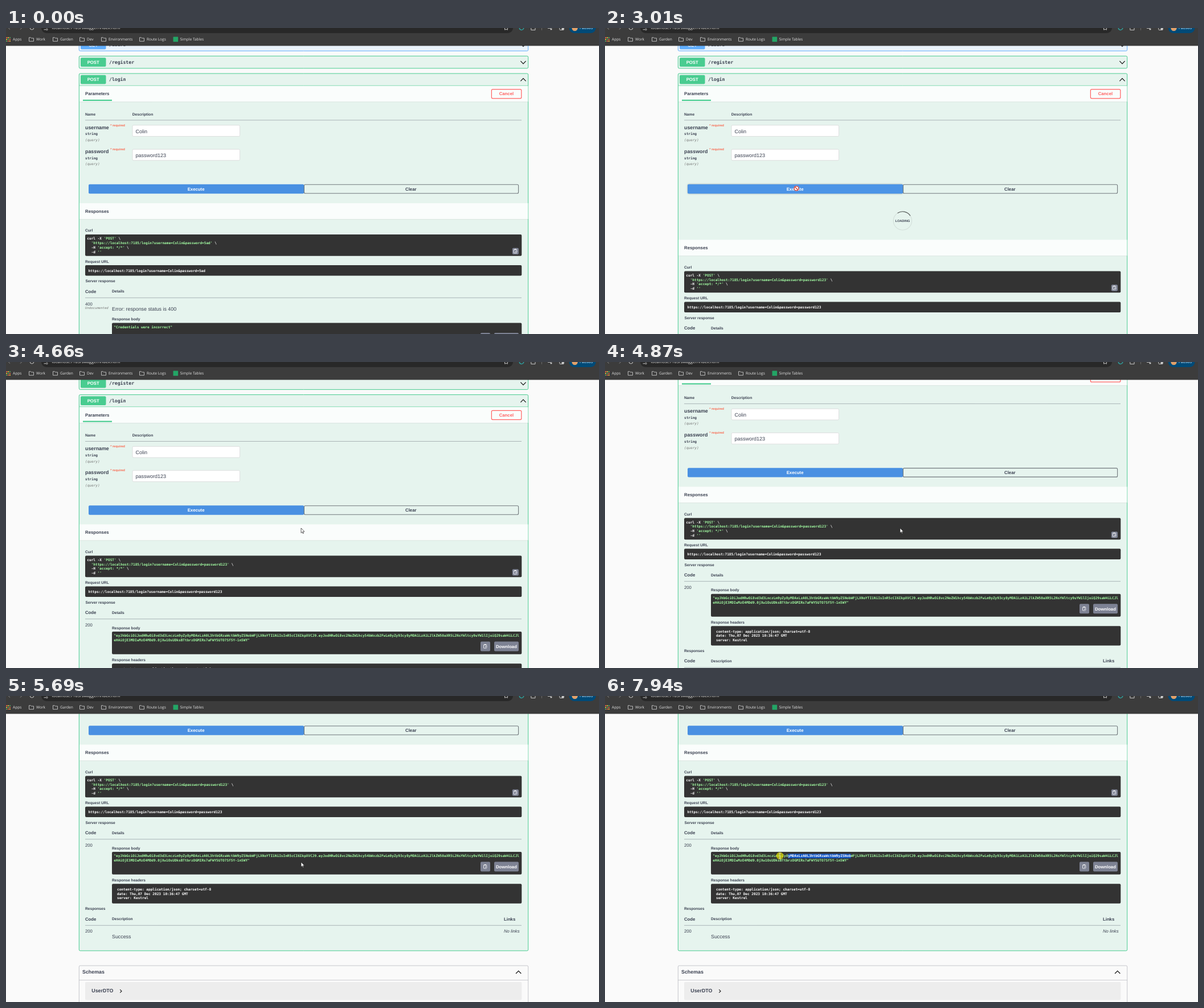
An HTML page with a canvas for the animation above (8000 ms loop, 1041x538 px).

```html
<!DOCTYPE html>
<html lang="en">
<head>
<meta charset="utf-8">
<title>API page</title>
<style>
  html, body { margin: 0; width: 100%; height: 100%; overflow: hidden; background: #fafafa; }
  canvas { display: block; }
</style>
</head>
<body>
<canvas id="stage" width="1041" height="538"></canvas>
<script>
const ctx = document.getElementById('stage').getContext('2d');
const LOOP = 8000;
const SANS = '"Liberation Sans", Arial, sans-serif';
const MONO = '"DejaVu Sans Mono", monospace';
const UI = '"Open Sans", sans-serif';
const INK = '#3b4151', GREEN = '#49cc90', DARK = '#333', CODE = '#a2fca2', GREY = '#7d8293';
const CHAR = 3.672, MONO_SIZE = 6.1;
const USER = 'Colin';
const TOKEN = [
  '"eyJhbGciOiJodHRwOi8vd3d3LnczLm9yZy8yMDAxLzA0L3htbGRzaWctbW9yZSNobWFjLXNoYTI1NiIsInR5cCI6IkpXVCJ9.' +
  'eyJodHRwOi8vc2NoZW1hcy54bWxzb2FwLm9yZy93cy8yMDA1LzA1L2lkZW50aXR5L2NsYWltcy9uYW1lIjoiQ29saW4iLCJl',
  'eHAiOjE3MDIwMzE4MDd9.0jXw1OsUDksBTtbrzDGMIRs7aFWY5UTO7Sf5Y-1n5WY"'
];
const TOKEN_X = 189.3, ANCHOR = 66;

const BURSTS = [
  [130, 880, 12], [950, 1720, 12], [1790, 2550, 12], [2600, 3360, 12], [3430, 3920, 8],
  [4600, 5290, 11], [5690, 6450, 12], [6520, 7010, 8], [7210, 7940, 12]
];
const LOAD_START = 2985, LOAD_END = 3495;
const SCROLL = [[4530, 0], [4600, 5], [4738, 40], [4873, 87.5], [5151, 193], [5221, 213], [5290, 222.5]];
const POINTER = [
  [130, 1000, 526], [400, 800, 330], [700, 320, 160], [880, 203, 80], [1090, 188, 118], [1350, 260, 175],
  [1720, 255, 229], [1790, 245, 224], [2050, 165, 268], [2250, 155, 292], [2550, 332, 284], [2600, 336, 282],
  [3440, 336, 282], [3640, 395, 292], [3920, 518, 292], [5690, 518, 292], [5900, 420, 335], [6100, 300, 330],
  [6250, 268, 290], [6330, 290, 260], [6450, 310, 300], [6520, 317, 338], [6590, 355, 335], [6660, 401, 306],
  [6800, 430, 295], [7010, 433, 281], [7210, 432, 281], [7280, 428, 288], [7350, 420, 288], [7420, 404, 282],
  [7940, 307, 281]
];

function snap(t) {
  for (let i = BURSTS.length - 1; i >= 0; i--) {
    const [a, b, n] = BURSTS[i];
    if (t < a) continue;
    const step = (b - a) / (n - 1);
    return Math.min(b, a + Math.floor((t - a + 8) / step) * step);
  }
  return 0;
}

// Linear interpolation through [time, ...values] points
function along(points, t) {
  if (t <= points[0][0]) return points[0].slice(1);
  for (let i = 1; i < points.length; i++) {
    const p = points[i - 1], q = points[i];
    if (t <= q[0]) {
      const k = (t - p[0]) / (q[0] - p[0]);
      return p.slice(1).map((v, j) => v + (q[j + 1] - v) * k);
    }
  }
  return points[points.length - 1].slice(1);
}

function text(s, x, y, size, { color = INK, style = '', font = SANS, align = 'left' } = {}) {
  ctx.font = `${style} ${size}px ${font}`;
  ctx.textAlign = align;
  ctx.fillStyle = color;
  ctx.fillText(s, x, y);
}
const bold = (s, x, y, size = 6.65, color = INK, align = 'left') =>
  text(s, x, y, size, { color, style: 'bold', align });
const mono = (s, x, y, color = '#fff', size = MONO_SIZE, style = 'bold') =>
  text(s, x, y, size, { color, style, font: MONO });

function box(x, y, w, h, fill, r = 2, stroke, lw = 1) {
  ctx.beginPath();
  ctx.roundRect(x, y, w, h, r);
  if (fill) { ctx.fillStyle = fill; ctx.fill(); }
  if (stroke) { ctx.strokeStyle = stroke; ctx.lineWidth = lw; ctx.stroke(); }
}
function line(points, color, lw = 1, close) {
  ctx.beginPath();
  points.forEach(([x, y]) => ctx.lineTo(x, y));
  if (close) ctx.closePath();
  ctx.strokeStyle = color;
  ctx.lineWidth = lw;
  ctx.stroke();
}
function disc(x, y, r, fill) {
  ctx.beginPath();
  ctx.arc(x, y, r, 0, 7);
  ctx.fillStyle = fill;
  ctx.fill();
}
function arc(x, y, r, a, b, color, lw) {
  ctx.beginPath();
  ctx.arc(x, y, r, a, b);
  ctx.strokeStyle = color;
  ctx.lineWidth = lw;
  ctx.stroke();
}
const rule = y => line([[139, y], [905, y]], 'rgba(59,65,81,.45)', 0.8);
const chevron = (x, y, d) => line([[x - 4.6, y - 2.3 * d], [x, y + 2.3 * d], [x + 4.6, y - 2.3 * d]], '#111', 1.2);

function summary(y, verb, path, color, open) {
  box(131, y + 3, 44.5, 15.7, color, 2);
  bold(verb, 153.2, y + 13.7, 7.75, '#fff', 'center');
  mono(path, 181, y + 13.5, INK, 8.13);
  chevron(908, y + 11.3, open ? -1 : 1);
}

function field(y, name, value) {
  bold(name, 139, y + 5, 8.86);
  bold('* required', 183.3, y, 5.5, 'rgba(255,60,30,.75)');
  mono('string', 139, y + 15.7, INK);
  mono('(query)', 139, y + 26.4, '#777', MONO_SIZE, 'italic');
  box(222, y - 1.7, 188.5, 19.6, '#fff', 2, '#d9d9d9', 0.8);
  text(value, 227.5, y + 12, 9);
}

function section(y, h) {
  ctx.fillStyle = 'rgba(255,255,255,.82)';
  ctx.fillRect(129, y, 787.5, h);
  line([[129, y + h + 0.3], [916.5, y + h + 0.3]], 'rgba(0,0,0,.09)', 0.8);
}

function copyIcon(x, y, size) {
  box(x, y, size, size, GREY, 2);
  const cx = x + size / 2, cy = y + size / 2;
  box(cx - 3, cy - 3, 5.2, 6.2, null, 0.5, '#fff', 0.8);
  box(cx - 1.8, cy - 3.8, 2.8, 1.6, '#fff', 0.4);
  box(cx - 0.2, cy - 0.6, 4, 3.2, GREY, 0);
  line([[cx + 3.6, cy + 0.8], [cx, cy + 0.8], [cx + 1.4, cy - 0.5]], '#fff', 0.7);
  line([[cx, cy + 0.8], [cx + 1.4, cy + 2.1]], '#fff', 0.7);
}

function request(password) {
  const url = `https://localhost:7185/login?username=${USER}&password=${password}`;
  section(308, 28);
  bold('Responses', 139, 324.8, 7.8);
  bold('Curl', 139, 358.4);
  box(139, 363, 766.3, 37.8, DARK);
  const rows = [
    ['curl -X ', "'POST'", ' \\'], ['  ', `'${url}'`, ' \\'],
    ['  -H ', "'accept: */*'", ' \\'], ['  -d ', "''", '']
  ];
  rows.forEach(([a, b, c], i) => {
    const y = 372.3 + i * 7.8;
    mono(a, 142.3, y);
    mono(b, 142.3 + a.length * CHAR, y, CODE);
    mono(c, 142.3 + (a + b).length * CHAR, y);
  });
  copyIcon(888.8, 386.8, 11.2);
  bold('Request URL', 139, 412.5);
  box(139, 417, 766.3, 18.6, DARK);
  mono(url, 144.5, 428.5);
  bold('Server response', 139.6, 447.4);
  bold('Code', 139, 465.8, 7.75);
  bold('Details', 186, 465.3);
  rule(474.3);
}

function downloads(y) {
  copyIcon(833, y, 17);
  box(857, y, 43, 17, GREY, 2);
  bold('Download', 878.4, y + 11.3, 7.75, '#fff', 'center');
}

function failure() {
  text('400', 139, 487.6, 7.75);
  mono('Undocumented', 139, 494.4, '#777', 5.65, 'italic');
  text('Error: response status is 400', 186, 497, 8.86);
  bold('Response body', 186, 514.2);
  box(186, 518.5, 719.3, 40, DARK);
  mono('"Credentials were incorrect"', TOKEN_X, 528, CODE);
  downloads(536);
}

function success() {
  text('200', 139, 487.5, 7.75);
  bold('Response body', 186, 492);
  box(186, 496.5, 719.3, 39.8, DARK);
  TOKEN.forEach((s, i) => mono(s, TOKEN_X, 505.9 + i * 7.8, CODE));
  downloads(514);
  bold('Response headers', 186, 548.2);
  box(186, 552.8, 719.3, 34.4, DARK);
  ['content-type: application/json; charset=utf-8', 'date: Thu,07 Dec 2023 10:36:47 GMT', 'server: Kestrel']
    .forEach((s, i) => mono(s, 195, 564.2 + i * 7.8));
  bold('Responses', 139, 598.8);
  bold('Code', 139, 617, 7.75);
  bold('Description', 186, 616.4);
  bold('Links', 874, 617, 7.75);
  rule(625.8);
  text('200', 139, 638.6, 7.75);
  text('No links', 874, 638.6, 7.75, { style: 'italic' });
  text('Success', 186, 648.2, 8.86);
}

// Selected run on one token row, from character a to b
function highlight(row, a, b) {
  if (b <= a) return;
  const x = TOKEN_X + a * CHAR, y = 505.9 + row * 7.8;
  ctx.fillStyle = '#0f55c4';
  ctx.fillRect(x, y - 5.9, (b - a) * CHAR, 7.8);
  mono(TOKEN[row].slice(a, b), x, y);
}
function selection(t) {
  if (t < 7215) return;
  const [x, y] = along(POINTER, Math.max(7210, t - 70));
  const i = Math.round((x - TOKEN_X) / CHAR);
  if (y > 285.6) {
    highlight(0, ANCHOR, TOKEN[0].length);
    highlight(1, 0, i);
  } else highlight(0, i, ANCHOR);
}

function loader(t) {
  const turn = (t - LOAD_START) / 1000 * Math.PI * 2 + 0.02;
  arc(522.4, 339, 16.2, 0, 7, 'rgba(85,85,85,.13)', 1.1);
  arc(522.4, 339, 16.2, turn - Math.PI * 0.75, turn - Math.PI * 0.25, 'rgba(0,0,0,.6)', 1.1);
  bold('LOADING', 522.4, 341.2, 5.6, INK, 'center');
}

function page(t, scroll, hover) {
  const loading = t >= LOAD_START && t < LOAD_END;
  ctx.save();
  ctx.translate(0, -scroll);
  box(128.3, 18.5, 788.4, 21.8, '#ebf3fb', 2, '#61affe');
  summary(18.8, 'GET', '/users', '#61affe');
  box(128.3, 49.3, 788.4, 21.6, '#e6f4ee', 2, GREEN);
  summary(49.2, 'POST', '/register', GREEN);
  box(128.3, 80, 788.4, 590.4, '#e6f4ee', 2, GREEN);
  summary(79.7, 'POST', '/login', GREEN, true);
  line([[128.5, 101.3], [916.5, 101.3]], GREEN, 0.7);
  section(101.8, 27.8);
  bold('Parameters', 139, 118.3, 7.75);
  ctx.fillStyle = GREEN;
  ctx.fillRect(135, 126, 51, 2.2);
  box(852.4, 107.8, 52.4, 16, null, 2, '#ff6060', 1.2);
  bold('Cancel', 878.4, 118.3, 7.75, '#ff6060', 'center');
  bold('Name', 139, 153.5);
  bold('Description', 221.7, 153.5);
  rule(162);
  field(172.6, 'username', USER);
  field(214.9, 'password', 'password123');

  ctx.save();
  if (hover) { ctx.shadowColor = 'rgba(0,0,0,.3)'; ctx.shadowBlur = 3; }
  box(145, 274.8, 378, 16.4, hover ? '#4c94e6' : '#4990e2', 2);
  ctx.restore();
  bold('Execute', 333.6, 285.7, 7.8, '#fff', 'center');
  box(523.4, 275.3, 376.2, 15.5, null, 2, '#70787c', 1.1);
  bold('Clear', 710.8, 285.7, 7.8, INK, 'center');

  if (loading) loader(t);
  ctx.save();
  if (loading) ctx.translate(0, 64.4);
  request(t < LOAD_START ? '5ad' : 'password123');
  if (t < LOAD_START) failure();
  else if (!loading) success();
  ctx.restore();
  if (t >= LOAD_END) selection(t);

  box(128.3, 696.6, 788.4, 100, '#fafafa', 2, 'rgba(59,65,81,.35)', 0.8);
  bold('Schemas', 134, 710.3, 8.86);
  chevron(899.7, 708.2, -1);
  line([[128.5, 722], [916.5, 722]], 'rgba(59,65,81,.3)', 0.8);
  box(139, 725.3, 766.3, 31.7, '#ededed', 2);
  bold('UserDTO', 150.3, 743.7, 8.86);
  line([[200.2, 738.6], [203, 741.4], [200.2, 744.2]], '#222', 1.2);
  ctx.restore();
}

function browser() {
  const icon = '#c7c7c7';
  ctx.fillStyle = '#3c3c3c';
  ctx.fillRect(0, 0, 1041, 31.4);
  box(62, -12, 828, 21, '#282828', 9);
  text('localhost:7185/swagger/index.html', 80.5, 2.4, 7.35, { color: '#e3e3e3', font: UI });
  line([[7, 2.6], [3.8, -0.6]], '#8a8a8a');
  line([[25, 2.6], [28.2, -0.6]], '#8a8a8a');
  arc(45.5, -0.4, 3.4, 0, Math.PI, icon, 1);
  line([[66.5, 2.8], [70, 2.8]], icon);
  arc(71.8, 2.6, 1.3, 0, 7, icon, 0.9);
  line([[875.2, -1], [875.8, 3.4], [878, 2], [880.2, 3.4], [880.8, -1]], icon);
  arc(905, -0.5, 3.9, 0.1, 3, '#2f9c9c', 1.5);
  line([[921.8, -1], [921.8, 3.6], [929, 3.6], [929, -1]], icon);
  line([[940.5, 0], [940.5, 4]], '#6a6a6a');
  line([[951, 0.4], [956, 0.4]], icon);
  disc(957, 2, 1.6, icon);
  box(971.8, -4, 7.4, 7.5, null, 1, icon);
  box(975.5, -4, 3.7, 7.5, icon, 0);
  box(988.5, -12, 47, 21, '#004a77', 9);
  disc(998.5, 0, 5.2, '#e0a06a');
  text('Paused', 1007, 2.4, 6.8, { color: '#d3e8fb', font: UI });

  const dots = ['#ea5a4c', '#e9b83a', '#4fae62'];
  for (let i = 0; i < 9; i++) {
    ctx.fillStyle = dots[(i + Math.floor(i / 3)) % 3];
    ctx.fillRect(-0.2 + (i % 3) * 3, 16 + Math.floor(i / 3) * 3, 2, 2);
  }
  const label = (s, x) => text(s, x, 22.4, 6.55, { color: '#e3e3e3', font: UI });
  label('Apps', 12);
  [['Work', 40], ['Garden', 82], ['Dev', 129], ['Environments', 167], ['Route Logs', 234]].forEach(([s, x]) => {
    line([[x + 0.5, 16.7], [x + 3.4, 16.7], [x + 4.5, 17.9], [x + 8.5, 17.9], [x + 8.5, 23.3], [x + 0.5, 23.3]], icon, 0.9, true);
    label(s, x + 13);
  });
  box(293.5, 15.6, 8.6, 8.6, '#23a566', 0.5);
  label('Simple Tables', 305.5);
}

function shape(points, x, y, fill, stroke) {
  ctx.beginPath();
  points.forEach(([a, b]) => ctx.lineTo(x + a, y + b));
  ctx.closePath();
  ctx.fillStyle = fill;
  ctx.fill();
  ctx.strokeStyle = stroke;
  ctx.lineWidth = 0.7;
  ctx.stroke();
}
const ARROW = [[0, 0], [0, 8.5], [2, 6.7], [3.2, 9.6], [4.5, 9.1], [3.3, 6.3], [5.9, 6.2]];
const HAND = [[-1, -4], [0.4, -4], [0.4, 0], [4, 1], [4, 4], [3, 6.5], [-1.5, 6.5], [-4, 2.5], [-3, 1.8], [-1, 3.5]];

function pointer(t, x, y, hover) {
  const typing = t < 2600 && x > 222 && x < 410 && ((y > 171 && y < 191) || (y > 213 && y < 233));
  const reading = t > 6950;
  if (reading && t > 7215 || t > 2870 && t < LOAD_START) disc(x, y, 6.5, 'rgba(225,220,0,.7)');
  if (t >= LOAD_START && t < LOAD_END && hover) {
    disc(x, y, 4.6, '#fff');
    arc(x, y, 3.9, 0, 7, '#d23c32', 1.4);
    line([[x - 2.7, y - 2.7], [x + 2.7, y + 2.7]], '#d23c32', 1.4);
  } else if (typing || reading) {
    const c = reading ? '#ddd' : '#222';
    line([[x, y - 4.5], [x, y + 4.5]], c, 0.9);
    [-4.7, 4.7].forEach(d => line([[x - 1.8, y + d], [x + 1.8, y + d]], c, 0.8));
  } else if (hover || t < 1400 && x < 917 && y > 80 && y < 101) {
    shape(HAND, x, y, '#fff', '#222');
  } else shape(ARROW, x, y, '#fff', '#222');
}

function draw(time) {
  const t = snap(time);
  const [scroll] = along(SCROLL, t);
  const [x, y] = along(POINTER, t);
  const hover = t > 1790 && scroll === 0 && x > 145 && x < 523 && y > 275 && y < 291;
  ctx.textRendering = 'geometricPrecision';
  ctx.fillStyle = '#fafafa';
  ctx.fillRect(0, 0, 1041, 538);
  page(t, scroll, hover);
  browser();
  if (t >= 130) pointer(t, x, y, hover);
}

const begin = performance.now();
function tick() {
  draw((performance.now() - begin) % LOOP);
  requestAnimationFrame(tick);
}
tick();
</script>
</body>
</html>
```
